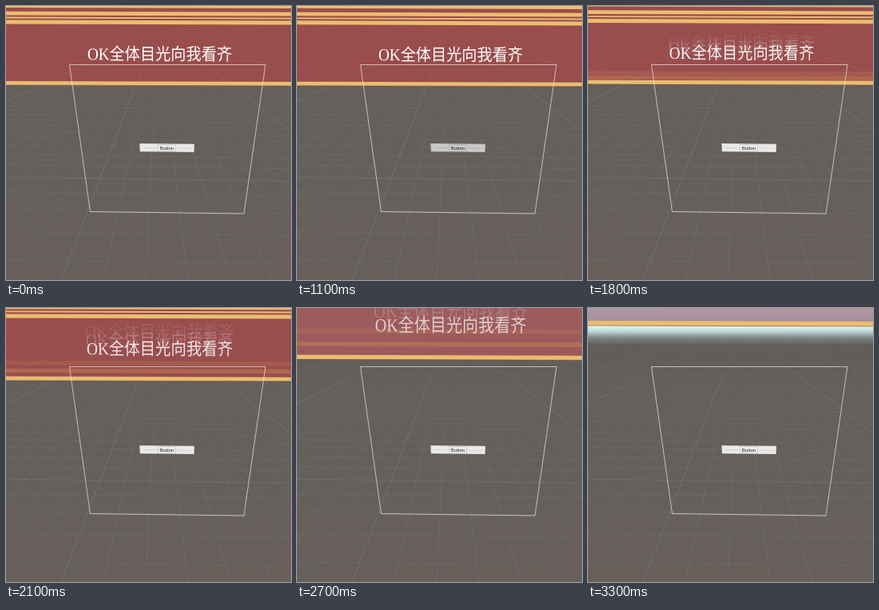
Animation, 357 px wide and 343 px high, one loop 3.4 s. Source, as an HTML page with a canvas:

```html
<!DOCTYPE html>
<html lang="zh-CN">
<head>
<meta charset="utf-8">
<style>
html, body { margin: 0; width: 100%; height: 100%; overflow: hidden; background: #655f5a; }
canvas { display: block; }
</style>
</head>
<body>
<canvas id="stage" width="357" height="343"></canvas>
<script>
const W = 357, H = 343, LOOP = 3400, START = 99.5;
const GOLD = '#ebbd70', RED = '#994d4d';
const ctx = document.getElementById('stage').getContext('2d');

const progress = (t, from, to) => Math.min(1, Math.max(0, (t - from) / (to - from)));

function gradient(y0, y1, ...stops) {
  const g = ctx.createLinearGradient(0, y0, 0, y1);
  stops.forEach(([p, c]) => g.addColorStop(p, c));
  return g;
}

function path(points) {
  ctx.beginPath();
  points.forEach(([x, y]) => ctx.lineTo(x, y));
  ctx.closePath();
}

function line(x0, y0, x1, y1, style) {
  ctx.beginPath();
  ctx.moveTo(x0, y0);
  ctx.lineTo(x1, y1);
  ctx.strokeStyle = style;
  ctx.stroke();
}

function ground() {
  ctx.fillStyle = gradient(0, H, [0, '#c8e4e6'], [.066, '#e0f6f5'], [.085, '#c0d8d8'],
    [.108, '#7f8988'], [.135, '#605d5a'], [.3, '#645f5b'], [1, '#675f5a']);
  ctx.fillRect(0, 0, W, H);
}

// Perspective floor: rows recede as 1 / depth, columns meet at one point
function grid() {
  const vx = 190, vy = 28, ink = a => `rgba(165,172,172,${a})`;
  ctx.lineWidth = 1;
  for (let n = 0; n < 36; n++) {
    const y = vy + 1 / (.00342 + n * .00047);
    const alpha = (n % 10 === 4 ? .18 : .12) * progress(y, 70, 190);
    line(0, y - 2.5, W, y + 2.5, ink(alpha));
  }
  for (let k = -26; k <= 26; k++) {
    const bold = (k + 32) % 10 === 0;
    line(vx, vy, 175 + 53 * k, H, gradient(bold ? 45 : 95, 200,
      [0, ink(0)], [.4, ink(bold ? .2 : .05)], [1, ink(bold ? .22 : .13)]));
  }
}

// Banner space: x from its centre, y from its lower edge
function inBanner(edge, draw) {
  const d = START - edge;
  ctx.save();
  ctx.transform(1, .003, 0, 1, 192.5, edge);
  ctx.scale(1 + d * .0013, 1 + d * .0027);
  draw();
  ctx.restore();
}

function bar(bottom, height, color = GOLD) {
  ctx.fillStyle = color;
  ctx.fillRect(-250, -bottom - height, 500, height);
}

function title(alpha) {
  ctx.save();
  ctx.translate(0, -32);
  ctx.scale(1, 1.1);
  ctx.globalAlpha = alpha;
  ctx.font = '300 19.2px "Liberation Serif", "Noto Sans CJK SC", "Noto Sans CJK", serif';
  ctx.textAlign = 'center';
  ctx.fillStyle = '#fff';
  ctx.fillText('OK全体目光向我看齐', 0, 0);
  ctx.restore();
}

// The banner dips a little, then speeds upwards, trailing echoes
function banner(t) {
  const u = progress(t, 1500, 3300);
  const edge = START + 1.5 * progress(t, 700, 1500) - 78.5 * u ** 1.9;
  const gap = 22 * u ** .75;

  inBanner(edge, () => bar(0, 200, RED));
  ctx.globalAlpha = u ** 4;
  ctx.fillStyle = gradient(0, edge, [0, '#ad98a4'], [1, '#a58c98']);
  ctx.fillRect(0, 0, W, edge - 2);

  if (u) {
    for (const n of [2, 1]) {
      inBanner(edge - gap * n, () => {
        ctx.globalAlpha = .4 / n;
        bar(0, 5, '#d08a52');
        title(.2 / n);
      });
    }
  }
  ctx.globalAlpha = 1;
  inBanner(edge, () => {
    bar(0, 5);
    bar(76.5, 5);
    bar(83.5, 1.8);
    bar(87.5, 4.7);
    bar(97, 4);
    bar(-.4, .8, 'rgba(110,70,50,.5)');
    title(1 - .45 * u);
  });
}

function button(pressed) {
  const faint = 'rgba(120,120,120,.3)';
  path([[167.3, 172], [236, 172.8], [235.6, 183], [167.8, 182.2]]);
  ctx.fillStyle = pressed ? '#c9c8c8' : '#ebeaea';
  ctx.fill();
  ctx.lineWidth = .7;
  ctx.strokeStyle = faint;
  ctx.stroke();
  line(172, 177.5, 190, 177.7, faint);
  line(213, 178, 232, 178.2, faint);
  ctx.strokeRect(190.5, 173.5, 22, 8.5);
  ctx.font = '6px "Liberation Sans", Arial, sans-serif';
  ctx.textAlign = 'center';
  ctx.fillStyle = '#222';
  ctx.fillText('Button', 201.5, 179.7);
}

function canvasFrame() {
  path([[79.5, 73.5], [325, 73.5], [298, 260], [105.5, 257.5]]);
  ctx.lineWidth = 1;
  ctx.strokeStyle = 'rgba(232,232,230,.7)';
  ctx.stroke();
}

function frame() {
  const t = Math.floor(performance.now() % LOOP / 100) * 100;
  ground();
  banner(t);
  grid();
  canvasFrame();
  button(t >= 800 && t < 1200);
  requestAnimationFrame(frame);
}
frame();
</script>
</body>
</html>
```
